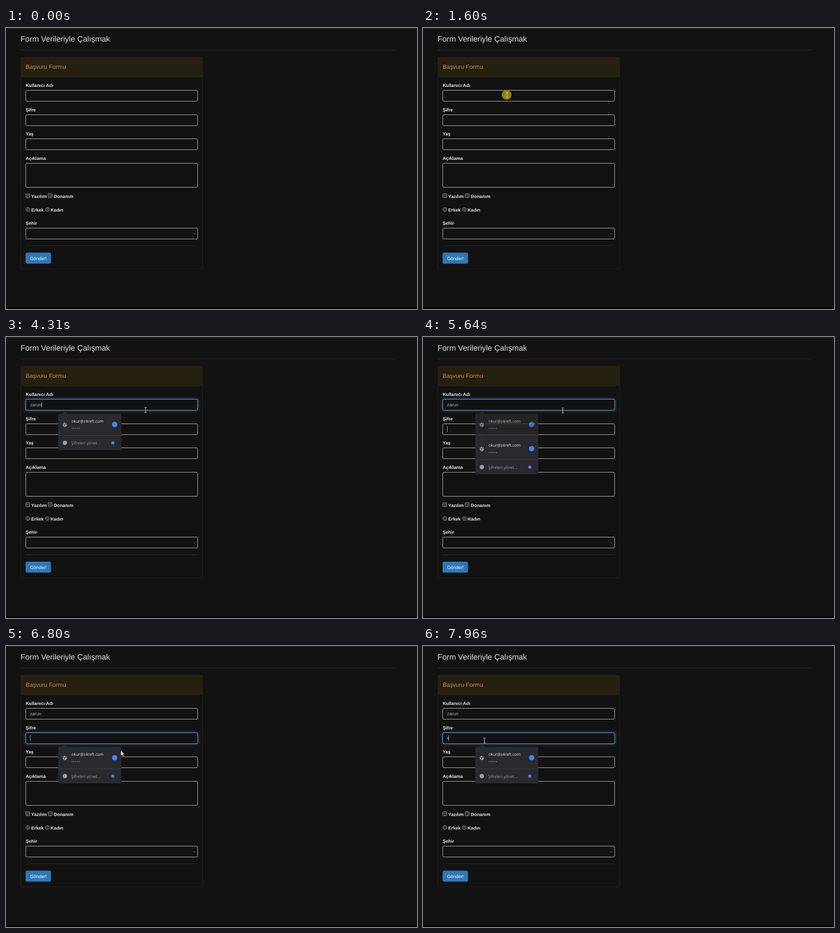
Recreate the animation shown at these times as an HTML page. Size 904x620 px, loop 8 s.

```html
<!DOCTYPE html>
<html lang="tr">
<head>
<meta charset="utf-8">
<title>Form</title>
<style>
  html, body { margin: 0; height: 100%; overflow: hidden; background: #121212; }
  svg { display: block; font: 10.08px "Liberation Sans", Arial, sans-serif; text-rendering: geometricPrecision; }
  .label { font-weight: bold; fill: #e9e7e4; }
  .field { fill: #121212; stroke: #c9c5be; }
  .glow { fill: #121212; stroke: #74a9d4; filter: drop-shadow(0 0 3px rgba(62, 136, 196, .75)); }
  .choice { fill: #3b3b3b; stroke: #858585; }
  .typed { fill: #b2aca2; }
  .rule { stroke: #292b2c; }
  .popup text { font: 8.8px "Open Sans", "Noto Sans", sans-serif; }
</style>
</head>
<body>
<svg width="904" height="620" viewBox="0 0 904 620">
  <defs>
    <g id="popup" class="popup">
      <path d="M117 169H123.500L130 164.500L136.500 169H251.500Q253.500 169 253.500 171V247.500Q253.500 249.500 251.500 249.500H117Q115 249.500 115 247.500V171Q115 169 117 169Z" fill="#292a2d"/>
      <path d="M115 217.500H253.500" stroke="#424347"/>
      <circle cx="129.500" cy="193.500" r="4.800" fill="#9aa0a6"/>
      <path d="M126 191.500L129 193L128.500 196.500M130.500 189.500L131.500 192L133.500 193.500" fill="none" stroke="#292a2d" stroke-width="1.300"/>
      <text x="144" y="188.500" fill="#e8eaed">okur@z4reft.com</text>
      <path d="M145.500 201.500h17" stroke="#a5a9ae" stroke-width="2" stroke-linecap="round" stroke-dasharray="0 4"/>
      <circle cx="239" cy="193" r="6" fill="#4285f4"/>
      <circle cx="129.500" cy="233.500" r="4.800" fill="#9aa0a6"/>
      <text x="143.500" y="237" fill="#9aa0a6">Şifreleri yönet...</text>
      <circle cx="235" cy="233.500" r="3.500" fill="#4285f4"/>
    </g>
  </defs>

  <rect width="904" height="620" fill="#121212"/>
  <rect width="904" height="1" fill="#303030"/>
  <rect y="616" width="904" height="4" fill="#0a0507"/>
  <text x="32" y="30" font-size="17.28" fill="#e4e2df">Form Verileriyle Çalışmak</text>
  <path class="rule" d="M32 48.500H856"/>

  <rect x="32.500" y="64.500" width="400" height="467" rx="2.500" fill="none" stroke="#26210f"/>
  <path d="M32 108.500V67Q32 64 35 64H430Q433 64 433 67V108.500Z" fill="#25200f"/>
  <text x="43.300" y="89.500" font-size="12.960" fill="#c88f50">Başvuru Formu</text>

  <g class="label">
    <text x="43.300" y="130">Kullanıcı Adı</text>
    <text x="43.300" y="184">Şifre</text>
    <text x="43.300" y="237">Yaş</text>
    <text x="43.300" y="291">Açıklama</text>
    <text x="55.500" y="374.500">Yazılım</text>
    <text x="105" y="374.500">Donanım</text>
    <text x="55.500" y="405">Erkek</text>
    <text x="98" y="405">Kadın</text>
    <text x="43.300" y="434">Şehir</text>
  </g>
  <g class="field">
    <rect x="43.500" y="137.500" width="378" height="24" rx="2.500"/>
    <rect x="43.500" y="191.500" width="378" height="24" rx="2.500"/>
    <rect x="43.500" y="244.500" width="378" height="24" rx="2.500"/>
    <rect x="43.500" y="298.500" width="378" height="53" rx="2.500"/>
    <rect x="43.500" y="441.500" width="378" height="24" rx="2.500"/>
  </g>
  <path d="M411 452.300L414 455.500L417 452.300" fill="none" stroke="#6a6a6a"/>
  <g class="choice">
    <rect x="43.500" y="365.500" width="9" height="9" rx="1"/>
    <rect x="92.500" y="365.500" width="9" height="9" rx="1"/>
    <circle cx="48" cy="400.500" r="4.500"/>
    <circle cx="91" cy="400.500" r="4.500"/>
  </g>
  <path class="rule" d="M43 480.500H422"/>
  <rect x="43.500" y="496" width="55" height="23.500" rx="2.500" fill="#2f78b7" stroke="#2e6da4"/>
  <text x="53" y="511.500" fill="#fff">Gönder!</text>

  <rect id="glow1" class="glow" x="43.500" y="137.500" width="378" height="24" rx="2.500"/>
  <rect id="glow2" class="glow" x="43.500" y="191.500" width="378" height="24" rx="2.500"/>
  <text id="user" class="typed" x="52.700" y="153"></text>
  <circle id="bullet" class="typed" cx="54.700" cy="203.500" r="1.400"/>
  <path id="caret" d="M0 0V12" stroke="#c4c0b8"/>
  <use id="popup1" href="#popup"/>
  <use id="popup2" href="#popup" y="53.500"/>

  <g id="cursor">
    <circle id="click" cx="-1" r="10.700" fill="#8b870c"/>
    <path id="beam" d="M-2.500 -5.500H-.8L0 -5L.8 -5.500H2.500M0 -5V5M-2.500 5.500H-.8L0 5L.8 5.500H2.500" fill="none" stroke="#dedede"/>
    <path id="arrow" d="M0 0V11L2.500 8.700L4.200 12.400L6 11.600L4.400 8H7.800Z" fill="#fff" stroke="#111" stroke-width=".4"/>
  </g>
</svg>
<script>
const PERIOD = 8000, BLINK = 530, NAME = "zarun";
const FOCUS_USER = 1700, FOCUS_PASS = 5640, BULLET = 7960;
const keyTimes = [2430, 2630, 2830, 3110, 4040];
// time, x, y
const path = [
  [500, 120, 584], [750, 148, 430], [1000, 198, 200], [1120, 208, 128], [1250, 188, 146],
  [1600, 185, 147.5], [2160, 185, 147.5], [2230, 186, 148], [2830, 186, 148], [3380, 209, 149],
  [3640, 209, 149], [3840, 211, 149], [4040, 211, 149], [4310, 307, 161], [4780, 307, 161],
  [4910, 307.5, 162], [5640, 307.5, 162], [6180, 299, 258], [6450, 299, 258], [6800, 253, 231],
  [7220, 135.5, 208.5]
];

const el = id => document.getElementById(id);
const show = (id, on) => el(id).setAttribute("opacity", +on);
const place = (id, x, y) => el(id).setAttribute("transform", `translate(${x} ${y})`);
const ramp = (t, a, b) => Math.min(1, Math.max(0, (t - a) / (b - a)));
const smooth = p => p * p * (3 - 2 * p);

function cursorAt(t) {
  const next = path.findIndex(p => p[0] > t);
  if (next < 0) return path.at(-1).slice(1);
  if (next === 0) return path[0].slice(1);
  const [a, b] = [path[next - 1], path[next]];
  const k = ramp(t, a[0], b[0]);
  return [a[1] + (b[1] - a[1]) * k, a[2] + (b[2] - a[2]) * k];
}

function draw(t) {
  const inPass = t >= FOCUS_PASS;
  const user = el("user");
  user.textContent = NAME.slice(0, keyTimes.filter(k => k <= t).length);
  show("bullet", t >= BULLET);

  // The caret restarts its blink on every focus or key press
  const last = [FOCUS_USER, ...keyTimes, FOCUS_PASS, BULLET].filter(k => k <= t).pop();
  show("caret", last !== undefined && (t - last) % (2 * BLINK) < BLINK);
  const userEnd = 53.5 + Math.floor(user.getComputedTextLength());
  place("caret", inPass ? (t >= BULLET ? 56.5 : 53.5) : userEnd, inPass ? 197 : 143.5);

  const swap = smooth(ramp(t, FOCUS_PASS, FOCUS_PASS + 150));
  show("glow1", ramp(t, FOCUS_USER - 30, FOCUS_USER + 60) * (1 - swap));
  show("glow2", swap);
  show("popup1", t < FOCUS_USER ? 0 : 1 - ramp(t, FOCUS_PASS - 40, FOCUS_PASS + 160));
  show("popup2", inPass);

  const [x, y] = cursorAt(t);
  const arrow = t < 1060 || (t >= 6500 && t < 7300);
  place("cursor", x, y);
  show("cursor", t >= 500);
  show("click", t >= 1530 && t < FOCUS_USER);
  show("arrow", arrow);
  show("beam", !arrow);
}

const start = performance.now();
function frame() {
  draw((performance.now() - start) % PERIOD);
  requestAnimationFrame(frame);
}
frame();
</script>
</body>
</html>
```
